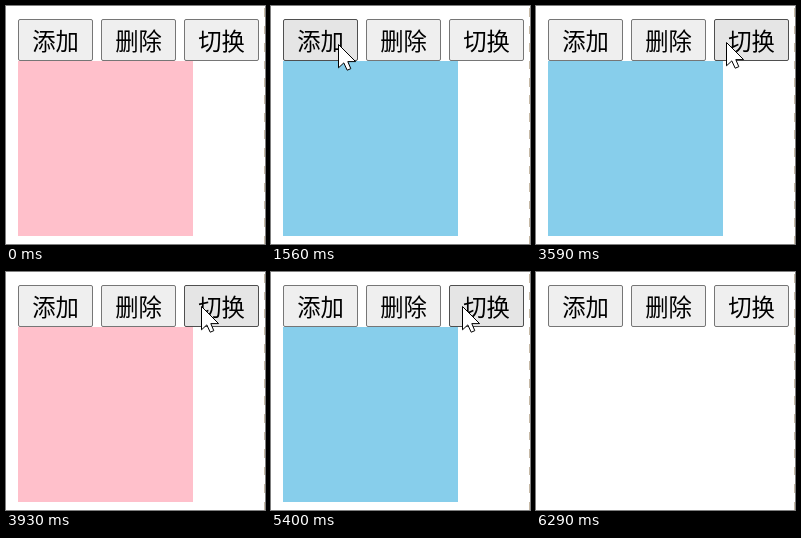
Recreate the animation shown at these times as an HTML page. Size 259 by 238 pixels, loop 7.89 s.

```html
<!DOCTYPE html>
<html lang="zh-CN">
<head>
<meta charset="utf-8">
<title>添加 删除 切换</title>
<style>
html, body { margin: 0; width: 100%; height: 100%; overflow: hidden; background: #fff; }
#stage { position: relative; width: 259px; height: 238px; overflow: hidden; }
.btn {
  position: absolute; top: 13px; width: 75px; height: 42px; box-sizing: border-box;
  border: 1px solid #767676; border-radius: 2px; background: #efefef; color: #000;
  font: 350 23.33px/40px "Noto Sans CJK SC", "Noto Sans CJK", sans-serif;
  text-align: center; white-space: nowrap;
}
.btn.hover { background: #e5e5e5; border-color: #4f4f4f; }
.btn.active { background: #f5f5f5; border-color: #8d8d8d; }
#box { position: absolute; left: 12px; top: 55px; width: 175px; height: 175px; }
#edge {
  position: absolute; left: 258px; top: 0; width: 1px; height: 238px;
  background: repeating-linear-gradient(#fff 0 2px, #c6b9a6 2px 10.75px, #fff 10.75px 17.5px);
}
svg { position: absolute; left: 0; top: 0; }
</style>
</head>
<body>
<div id="stage">
  <div class="btn" style="left:12px">添加</div>
  <div class="btn" style="left:95px">删除</div>
  <div class="btn" style="left:178px">切换</div>
  <div id="box"></div>
  <div id="edge"></div>
  <svg width="259" height="238">
    <g id="pointer">
      <path d="M.5 .5V23.8L5.8 18.9L9.2 26.2L12.8 24.7L9.8 17.6H17.6Z" fill="#fff" stroke="#000" stroke-linejoin="round"/>
      <circle id="halo" r="21" fill="#ff0" fill-opacity=".5"/>
    </g>
  </svg>
</div>
<script>
const LOOP = 7890, STEP = 70, SHOW = 330, HIDE = 6290;
const linear = u => u;
const out = u => 1 - (1 - u) ** 2;
const smooth = u => u * u * (3 - 2 * u);

// start, steps, target x, target y, easing
const moves = [
  [330, 1, 215, 143, linear],
  [400, 8, 68, 38, out],
  [1090, 1, 67, 38, linear],
  [2630, 1, 69, 38, linear],
  [2760, 9, 140, 41, smooth],
  [3450, 3, 190, 36, linear],
  [3660, 2, 195, 34, linear],
  [5400, 6, 141, 39, smooth],
  [6080, 1, 146, 44, linear],
  [6150, 1, 168, 66, linear],
  [6220, 1, 219, 119, linear]
];
const clicks = [1490, 3860, 4860, 5880];
const fills = [[0, 'pink'], [1560, 'skyblue'], [3930, 'pink'], [4930, 'skyblue'], [5950, 'transparent']];

const $ = id => document.getElementById(id);
const buttons = [...document.querySelectorAll('.btn')];
const box = $('box'), pointer = $('pointer'), halo = $('halo');

function position(t) {
  let x = 215, y = 143;
  for (const [start, n, tx, ty, ease] of moves) {
    if (t < start) break;
    const k = Math.floor((t - start) / STEP) + 1;
    const u = ease(Math.min(1, k / n));
    x += (tx - x) * u;
    y += (ty - y) * u;
  }
  return [Math.round(x), Math.round(y)];
}

function draw(t) {
  const visible = t >= SHOW && t < HIDE;
  const pressed = clicks.some(c => t >= c && t < c + STEP);
  const [x, y] = position(t);
  pointer.style.display = visible ? '' : 'none';
  halo.style.display = pressed ? '' : 'none';
  pointer.setAttribute('transform', `translate(${x} ${y})`);
  box.style.background = fills.filter(f => t >= f[0]).pop()[1];
  buttons.forEach((b, i) => {
    const left = 12 + 83 * i;
    const over = visible && x >= left && x < left + 75 && y >= 13 && y < 55;
    b.classList.toggle('hover', over);
    b.classList.toggle('active', over && pressed && i === 1);
  });
}

const begin = performance.now();
function tick() {
  draw((performance.now() - begin) % LOOP);
  requestAnimationFrame(tick);
}
tick();
</script>
</body>
</html>
```
